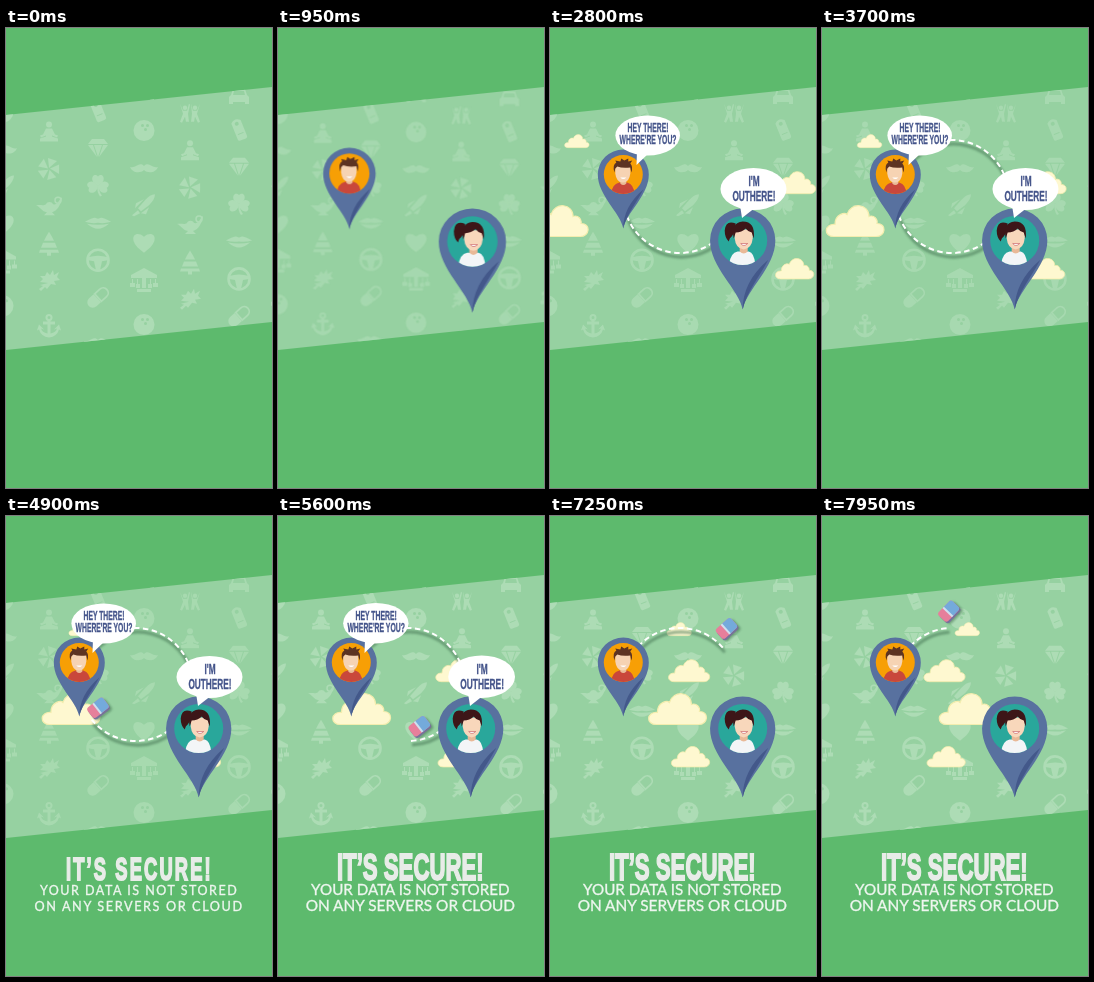
An HTML page for the animation above (8000 ms loop, 266x460 px).

```html
<!DOCTYPE html>
<html lang="en">
<head>
<meta charset="utf-8">
<title>It's secure</title>
<style>
html, body { margin: 0; width: 100%; height: 100%; overflow: hidden; background: #5dba6d; }
svg { display: block; width: 100%; height: 100%; }
text { text-anchor: middle; }
.talk { font-family: "Liberation Sans", Arial, sans-serif; font-weight: 700; fill: #44548a; stroke: #44548a; stroke-width: .35; }
#title { font-family: "Liberation Sans", Arial, sans-serif; font-weight: 700; fill: #e8ece8; stroke: #e8ece8; stroke-width: 2; }
.line { font-family: Lato, "Open Sans", sans-serif; fill: #eef6ef; stroke: #eef6ef; stroke-width: .35; }
</style>
</head>
<body>
<svg viewBox="0 0 266 460" preserveAspectRatio="none">
<defs>
  <clipPath id="band"><path d="M0 87L266 59V294L0 322Z"/></clipPath>
  <clipPath id="disc1"><circle r="19.500"/></clipPath>
  <clipPath id="disc2"><circle r="24.500"/></clipPath>
  <filter id="soft" filterUnits="userSpaceOnUse" x="-20" y="-20" width="306" height="500"><feGaussianBlur stdDeviation="1"/></filter>

  <g id="lotus"><circle cy="-7" r="3"/><path d="M-3-3H3L6 3 9 4 8 6 3 4 3 5 9 7V10H-9V7L-3 5-3 4-8 6-9 4-6 3Z"/></g>
  <g id="pinwheel"><path id="vane" d="M0-1L-1-11 8-8Z"/><use href="#vane" transform="rotate(72)"/><use href="#vane" transform="rotate(144)"/><use href="#vane" transform="rotate(216)"/><use href="#vane" transform="rotate(288)"/></g>
  <g id="lamp"><path d="M-13-1C-8-2-6 0-3-2-2-5 3-5 4-2 8-1 10-5 12-9L13-8C12-2 8 5 3 6L6 9H-5L-2 6C-8 5-9 0-13-1Z"/><circle cx="9" cy="-6" r="3" fill="none" stroke="#addcb5" stroke-width="1.5"/></g>
  <g id="tree"><path d="M0-12L3-7 5-3H-5L-3-7ZM-6-1H6L8 4H-8ZM-9 6H9L10 9H-10ZM-2 9H2V12H-2Z"/></g>
  <g id="leaves"><path d="M-1 2L-9 1-6-2-9-5-4-5-2-9 1-6 4-11 5-6 10-9 8-4 11-1 5 0 7 4 2 3-2 8-4 6-8 10-10 8-6 5-9 4Z"/></g>
  <g id="anchor"><circle cy="-8" r="2.5" fill="none" stroke="#addcb5" stroke-width="2"/><path d="M-1.5-6H1.5V-4H6V-1H1.5V8Q7 7 8 3L5 4 10-1 12 5 10 4Q8 11 0 12-8 11-10 4L-12 5-10-1-5 4-8 3Q-7 7-1.5 8V-1H-6V-4H-1.5Z"/></g>
  <g id="tag"><path transform="rotate(-22)" fill-rule="evenodd" d="M-5-8Q0-13 5-8V9Q5 11 3 11H-3Q-5 11-5 9ZM-2-6A2 2 0 0 0 2-6 2 2 0 0 0-2-6ZM-3 4V5H3V4Z"/></g>
  <g id="diamond"><path d="M-6-9H6L10-4H-10ZM-10-3H-5L-1 9ZM-4-3H4L0 9ZM5-3H10L1 9Z"/></g>
  <g id="clover"><path id="lobe" d="M0 0C-10-4-5-14 0-9 5-14 10-4 0 0Z"/><use href="#lobe" transform="rotate(105)"/><use href="#lobe" transform="rotate(-105)"/><path d="M-1 0H1Q1 7 4 10L2 11Q-1 7-1 0Z"/></g>
  <g id="lips"><path d="M-13-1Q-6-5-3-5L0-4 3-5Q6-5 13-1 6 1 0 0-6 1-13-1ZM-11 1Q0 3 11 1 5 6 0 6-5 6-11 1Z"/></g>
  <g id="wheel"><circle r="10.5" fill="none" stroke="#addcb5" stroke-width="2.6"/><path d="M-10-3Q0-6 10-3V0L4 1 2 10H-2L-4 1-10 0Z"/></g>
  <g id="pill"><g transform="rotate(-42)"><path d="M-1-5.500H-7A5.500 5.500 0 0 0-7 5.500H-1Z"/><path d="M0-5H7A5 5 0 0 1 7 5H0Z" fill="none" stroke="#addcb5" stroke-width="1.800"/></g></g>
  <g id="ball"><path fill-rule="evenodd" d="M-10.500 0A10.500 10.500 0 0 1 10.500 0 10.500 10.500 0 0 1-10.500 0ZM-3-5A1.500 1.500 0 0 0 0-5 1.500 1.500 0 0 0-3-5ZM2-5A1.500 1.500 0 0 0 5-5 1.500 1.500 0 0 0 2-5ZM0-1A1.500 1.500 0 0 0 3-1 1.500 1.500 0 0 0 0-1Z"/></g>
  <g id="stache"><path d="M0-2C5-7 8 1 14-1 11 6 3 5 0 2-3 5-11 6-14-1-8 1-5-7 0-2Z"/></g>
  <g id="rocket"><path d="M11-11Q6-11 1-5L-6 3-3 6 5 0Q11-6 11-11ZM0-6L-8-2-9 3ZM5 2L2 9-3 8ZM-6 5L-12 10-10 11-4 8Z"/></g>
  <g id="heart"><path d="M0 10C-18-2-10-14 0-6 10-14 18-2 0 10Z"/></g>
  <g id="ride"><path d="M0-12L13-5V-2H-13V-5ZM-2-2H2V8H-2ZM-12-1H-11V3H-9V7H-14V3H-12ZM11-1H12V3H14V7H9V3H11ZM-7-1H-6V4H-4V8H-8V4H-7ZM6-1H7V4H8V8H4V4H6ZM-7 9H7V12H-7Z"/></g>
  <g id="dance"><circle cx="-5" cy="-5" r="2.200"/><circle cx="5" cy="-5" r="2.200"/><path d="M-10-9L-7-2H-3L-1-9 0-8-2 1-1 9H-4L-5 4-8 10-10 9-7 1ZM10-9L7-2H3L1-9 2 1 1 9H4L5 4 8 10 10 9 7 1Z"/></g>
  <g id="car"><path d="M-6-8H6L8-2 10 0V7H6V5H-6V7H-10V0L-8-2ZM-5-6L-6-2H6L5-6Z" fill-rule="evenodd"/></g>

  <path id="cloud" fill="#fef8d0" stroke="#f3edae" stroke-width="1.200" d="M-21 15C-32 15-31 2-20 3-20-8-10-9-8-7-4-20 14-18 14-5 19-7 23-2 22 2 32 2 31 15 21 15Z"/>
  <g id="pin">
    <path fill="#58719f" d="M0 54C-3 38-25.500 21-25.500 0A25.500 25 0 0 1 25.500 0C25.500 21 3 38 0 54Z"/>
    <path fill="#43588a" d="M0 54C0 40 6 27 20 15 14 27 3 40 0 54Z"/>
  </g>
</defs>

<rect width="266" height="460" fill="#5dba6d"/>
<g clip-path="url(#band)">
  <rect y="58" width="266" height="265" fill="#96d1a1"/>
  <g id="icons" fill="#addcb5"></g>
  <g id="clouds"></g>
</g>
<g fill="none">
  <g id="shade" stroke="#4a7a58" stroke-width="3.200" opacity=".6" transform="translate(1.500 4)" filter="url(#soft)"><path/><path/></g>
  <g id="route" stroke="#fff" stroke-width="2" stroke-dasharray="5.500 3.500"><path/><path/></g>
</g>
<g id="eraser">
  <rect x="-9" y="-4" width="20" height="14" rx="3" fill="#3f6f50" opacity=".55" filter="url(#soft)"/>
  <rect x="-10" y="-5" width="20" height="13" rx="3" fill="#77719a"/>
  <rect x="-10" y="-7" width="20" height="13" rx="3" fill="#e67f9b"/>
  <path d="M-1-7H7Q10-7 10-4V3Q10 6 7 6H-1Z" fill="#74aadb"/>
  <path d="M-2-7H0V6H-2Z" fill="#cfe0ee"/>
</g>
<g id="pins">
  <g transform="translate(73.300 146.500)">
    <use href="#pin"/>
    <circle r="19.500" fill="#f79f05"/>
    <g clip-path="url(#disc1)">
      <path fill="#c9473b" d="M-12 20Q-12 10-4 8H4Q11 10 11 20Z"/>
      <path fill="#eabb97" d="M-3 4H3V9Q0 12-3 9Z"/>
      <path fill="#f6d3b3" d="M-8-9H7V-1Q6 8-.5 8-7 8-8-1Z"/>
      <path fill="#5d3322" d="M-9-2Q-11-10-7-12L-8-14-3-13-2-16 1-14 5-16 5-13 9-14 7-11Q10-8 8-2L7-7Q-1-6-6-8L-8-6Z"/>
      <path fill="#fff" d="M-3 3H3Q0 6-3 3Z"/>
    </g>
  </g>
  <g transform="translate(192.700 212.500)">
    <use href="#pin" transform="scale(1.280)"/>
    <circle r="24.500" fill="#29a79b"/>
    <g clip-path="url(#disc2)">
      <path fill="#3d1618" d="M-7-17Q-17-21-18-10-18-3-14 1-13-3-11-4-8-7-8-11Z"/>
      <path fill="#f3f5f7" d="M-14 27Q-13 12-5 11H6Q12 12 13 27Z"/>
      <path fill="#e9b997" d="M-3 5H5V11Q1 15-3 11Z"/>
      <path fill="#f8d7bb" d="M-8-11H10V-2Q9 8 1 9-7 8-8-2Z"/>
      <path fill="#3d1618" d="M-9-2Q-12-18 0-19 13-19 11-2L9-8Q5-9 3-12-1-8-7-8Z"/>
      <path fill="#fff" stroke="#c7525a" stroke-width=".6" d="M-2 3H5Q1 7-2 3Z"/>
    </g>
  </g>
</g>
<g id="talk1">
  <path fill="#fff" d="M87 123L86.500 137 100 124Z"/><ellipse cx="97.700" cy="107.500" rx="32.300" ry="20" fill="#fff"/>
  <g class="talk" font-size="12" transform="translate(98 0) scale(.565 1)"><text y="104.500">HEY THERE!</text><text y="116.500">WHERE'RE YOU?</text></g>
</g>
<g id="talk2">
  <path fill="#fff" d="M190 177L192 190 206 179Z"/><ellipse cx="203.500" cy="161" rx="33" ry="21" fill="#fff"/>
  <g class="talk" font-size="14" transform="translate(204 0) scale(.590 1)"><text y="158.500">I'M</text><text y="173">OUTHERE!</text></g>
</g>
<g id="copy">
  <g transform="translate(132.300 0) scale(.592 1)"><text id="title" y="363.800" data-size="37.500">IT’S SECURE!</text></g>
  <g transform="translate(132.300 0)">
    <text class="line" y="379.300" data-size="15.200">YOUR DATA IS NOT STORED</text>
    <text class="line" y="395" data-size="15.400">ON ANY SERVERS OR CLOUD</text>
  </g>
</g>
</svg>
<script>
const LOOP = 8000, STEP = 50, R = 56.5, CX = 130, CY = 168.5;
const $ = id => document.getElementById(id);
const prog = (t, a, b) => Math.min(1, Math.max(0, (t - a) / (b - a)));
const back = p => p <= 0 ? 0 : 1 + 2.7 * (p - 1) ** 3 + 1.7 * (p - 1) ** 2;
const smooth = p => p * p * (3 - 2 * p);
const outQuart = p => 1 - (1 - p) ** 4;
const set = (el, name, v) => el.setAttribute(name, v);
const show = (el, on) => { el.style.display = on ? '' : 'none'; };

function use(parent, id, transform) {
  const el = document.createElementNS('http://www.w3.org/2000/svg', 'use');
  set(el, 'href', '#' + id);
  if (transform) set(el, 'transform', transform);
  parent.appendChild(el);
  return el;
}

// Icon columns repeat every 141 px, half a row lower each time.
const columns = [
  { x: 43, y: 103.5, names: ['dance', 'lotus', 'pinwheel', 'lamp', 'tree', 'leaves', 'anchor'] },
  { x: 92, y: 120, names: ['tag', 'diamond', 'clover', 'lips', 'wheel', 'pill', 'stache'] },
  { x: 138, y: 102.5, names: ['car', 'ball', 'stache', 'rocket', 'heart', 'ride', 'ball'] }
];
columns.forEach(({ x, y, names }) => {
  for (let k = -1; k <= 1; k++)
    names.forEach((name, i) => {
      const dy = (i - 1) * 37.4 + (i === 6 ? 7 : 0) + k * 18.7;
      use($('icons'), name, `translate(${x + 141 * k} ${y + dy})`);
    });
});
use($('icons'), 'car', 'translate(233 69)');

const clouds = [
  { x: 33, v: .0266, y: 193.5, w: 59 },
  { x: 47.5, v: .023, y: 113.3, w: 25 },
  { x: 223.5, v: -.0238, y: 155, w: 42 },
  { x: 223.5, v: -.0234, y: 241, w: 39 }
].map(c => ({ ...c, el: use($('clouds'), 'cloud') }));

const lines = [...document.querySelectorAll('#copy text')].map(el => {
  const size = +el.dataset.size;
  el.style.fontSize = size + 'px';
  return { el, size, width: el.getComputedTextLength(), count: el.textContent.length };
});

function point(deg, cx = CX, cy = CY, r = R) {
  const a = deg * Math.PI / 180;
  return [cx + r * Math.cos(a), cy + r * Math.sin(a)];
}

function arc(i, from, to) {
  for (const id of ['shade', 'route']) {
    const el = $(id).children[i];
    show(el, from > to + .1);
    set(el, 'd', `M${point(from)}A${R} ${R} 0 0 0 ${point(to)}`);
    set(el, 'stroke-dashoffset', (160 - from) * Math.PI / 180 * R);
  }
}

function zoom(el, s, x, y) {
  show(el, s > .001);
  set(el, 'transform', `translate(${x} ${y}) scale(${s}) translate(${-x} ${-y})`);
}

function draw(t) {
  const dip = [[400, 1500], [2400, 4400], [4650, 5450]]
    .reduce((m, [a, b]) => Math.max(m, Math.sin(Math.PI * prog(t, a, b))), 0);
  set($('icons'), 'opacity', 1 - .3 * dip);
  zoom($('icons'), 1 - .018 * Math.sin(Math.PI * prog(t, 400, 1500)), 138, 190);

  for (const c of clouds)
    set(c.el, 'transform', `translate(${c.x + c.v * (t - 3700)} ${c.y}) scale(${c.w / 59})`);

  zoom($('pins'), back(prog(t, 400, 1050)), 137, 180);
  const leave = back(1 - prog(t, 5550, 6100));
  zoom($('talk1'), back(prog(t, 1200, 1700)) * leave, 86, 137);
  zoom($('talk2'), back(prog(t, 2200, 2700)) * leave, 192, 190);

  // The eraser circles from the first pin and wipes the route behind it.
  const turn = 137.5 - .0772 * (t - 4900), wiped = t < 4300 ? 180 : turn + 4;
  arc(0, Math.min(160, wiped), 160 - 110 * smooth(prog(t, 1400, 2150)));
  arc(1, Math.min(-10, wiped), -10 - 130 * smooth(prog(t, 2700, 3500)));
  show($('eraser'), t >= 4300);
  const [ex, ey] = point(turn, 135, 153, 58);
  set($('eraser'), 'transform', `translate(${ex} ${ey}) rotate(${-38 - 8 * prog(t, 6600, 7950)})`);

  const s = outQuart(prog(t, 4600, 5450));
  show($('copy'), s > 0);
  for (const { el, size, width, count } of lines) {
    const gap = width * (1 - s) / count;
    el.style.fontSize = size * s + 'px';
    el.style.letterSpacing = gap + 'px';
    set(el, 'x', gap / 2);
  }
}

const start = performance.now();
function tick() {
  const t = (performance.now() - start) % LOOP;
  draw(Math.floor(t / STEP) * STEP);
  requestAnimationFrame(tick);
}
tick();
</script>
</body>
</html>
```
